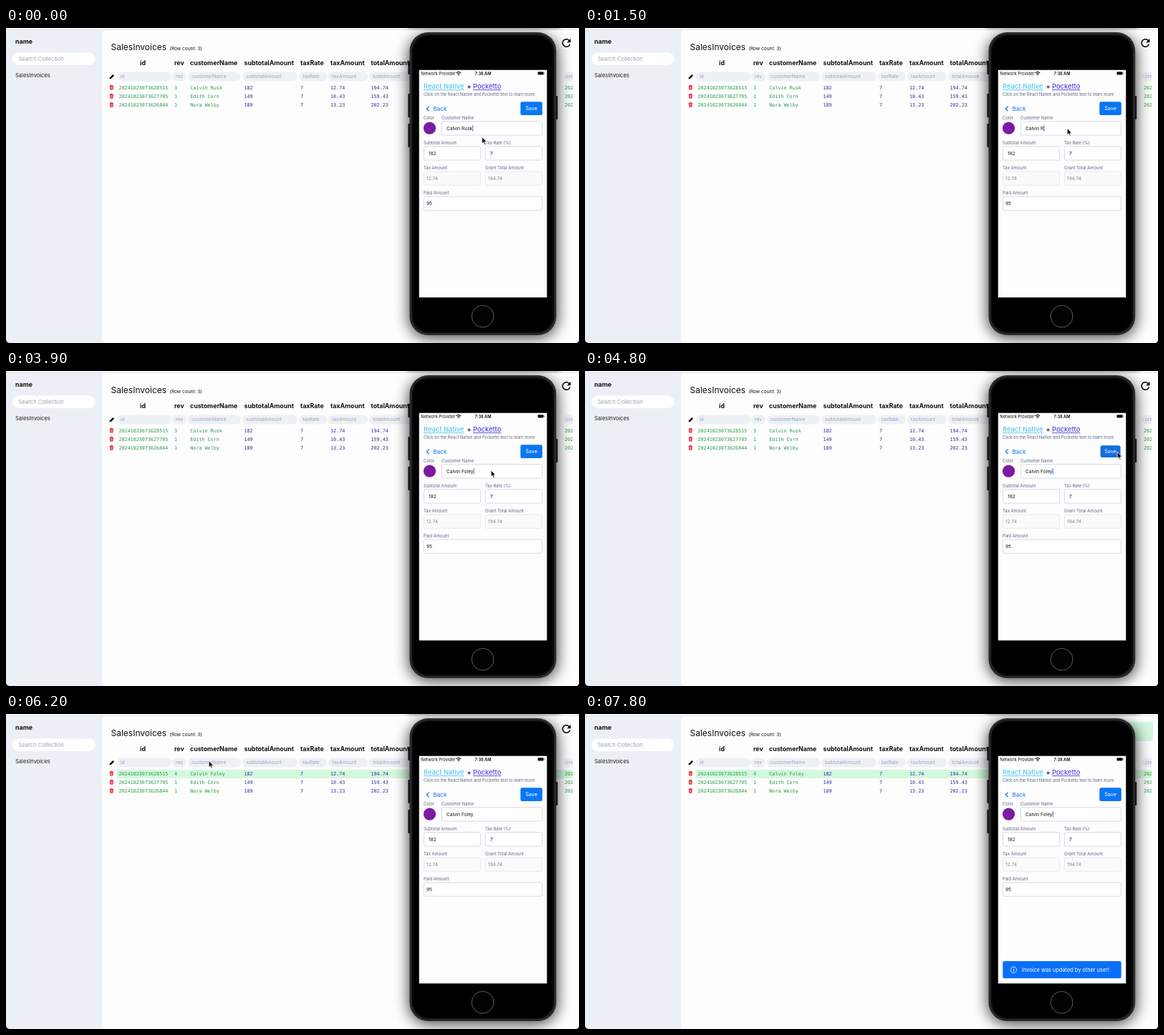
Recreate the animation shown at these times as an HTML page. Size 800 by 441 pixels, loop 7.9 s.

```html
<!DOCTYPE html>
<html lang="en">
<head>
<meta charset="utf-8">
<title>Invoice sync</title>
<style>
html, body { margin: 0; width: 100%; height: 100%; overflow: hidden; background: #000; }
svg { display: block; width: 100vw; height: 100vh; }
text { font-family: Inter, "Open Sans", sans-serif; white-space: pre; }
.b { font-weight: 700; }
.sb { font-weight: 600; }
.m { font-weight: 500; }
.u { font-weight: 500; text-decoration: underline; }
.mono { font-family: "DejaVu Sans Mono", monospace; }
</style>
</head>
<body>
<svg id="stage" viewBox="0 0 800 441" preserveAspectRatio="none"></svg>
<script>
const LOOP = 7900;
const GREEN = '#2b9a48', NAVY = '#34309a', MUTED = '#98a3b5', LABEL = '#5d6880';

const text = (x, y, size, str, fill = '#111', cls = '', more = '') =>
  `<text x="${x}" y="${y}" font-size="${size}" fill="${fill}" class="${cls}" ${more}>${str}</text>`;
const rect = (x, y, w, h, fill, r = 0, more = '') =>
  `<rect x="${x}" y="${y}" width="${w}" height="${h}" rx="${r}" fill="${fill}" ${more}/>`;
const path = (d, more) => `<path d="${d}" ${more}/>`;

// Collection browser
const columns = [
  ['id', 155, 76, 187], ['rev', 232, 20, 235], ['customerName', 254, 74, 257],
  ['subtotalAmount', 330, 77, 332.5], ['taxRate', 409, 39, 411],
  ['taxAmount', 450, 55, 453], ['totalAmount', 507, 60, 509.5]
];
const rows = [
  ['20241023073628515', '3', 'Calvin Rusk', '182', '7', '12.74', '194.74'],
  ['20241023073627705', '1', 'Edith Corn', '149', '7', '10.43', '159.43'],
  ['20241023073626844', '1', 'Nora Welby', '189', '7', '13.23', '202.23']
];
const cellX = [157.5, 235, 257.3, 332.5, 411, 453, 509.5];

const header = columns.map(([name, x, w, hx]) =>
  text(hx, 52, 8.8, name, '#111', 'b') +
  rect(x, 61.5, w, 13, '#edf0f5', 6.5) +
  text(x + 5, 70.2, 6.7, name, MUTED)).join('');

const trash = y =>
  `<g transform="translate(144.6 ${y - 6.3})" fill="none" stroke="#e5262b" stroke-width=".9">` +
  path('M0 1.5H5.4M1.7 1.3V.4H3.7V1.3', '') +
  path('M.7 1.8L1 6.4H4.4L4.7 1.8Z', 'fill="#f47c7e"') + '</g>';

const body = rows.map((row, i) => {
  const y = 86 + i * 12.1;
  return trash(y) + row.map((value, c) =>
    text(cellX[c], y, 6.72, value, c < 3 ? GREEN : NAVY, 'mono',
      i ? '' : `id="cell${c}"`)).join('') +
    text(780, y, 6.72, '202', GREEN, 'mono');
}).join('');

const browser =
  rect(0, -8, 800, 449, '#ecf0f6', 5) +
  rect(0, 0, 800, 2.2, '#f6f7f9') + rect(0, 2.2, 800, .8, '#e2e5ea') +
  path('M800 3H140Q134 3 134 9V435Q134 441 140 441H795Q800 441 800 436Z', 'fill="#fdfdfe"') +
  text(13, 22, 8.9, 'name', '#111', 'b') +
  rect(9, 34.5, 115.5, 17.5, '#fff', 8.7) +
  text(17.5, 46, 7.6, 'Search Collection', MUTED) +
  text(13, 69.4, 7.55, 'SalesInvoices', '#222') +
  text(146.5, 30.6, 12, 'SalesInvoices') +
  text(228.5, 30.6, 6.55, '(Row count: 3)') +
  path('M17.65 6.35C16.2 4.9 14.21 4 12 4c-4.42 0-7.99 3.58-7.99 8s3.57 8 7.99 8c3.73 0 6.84-2.55 7.73-6h-2.08c-.82 2.33-3.04 4-5.65 4-3.31 0-6-2.69-6-6s2.69-6 6-6c1.66 0 3.14.69 4.22 1.78L13 11h7V4l-2.35 2.35z',
    'transform="translate(773.4 12) scale(.75)"') +
  path('M144.5 71.5L145 69.2 149.3 64.9 151.1 66.7 146.8 71Z', 'fill="#111"') +
  rect(154.5, 78, 636.5, 12, '#d2f8dd', 0, 'id="mark"') +
  `<g clip-path="url(#page)">${header}${rect(778, 61.5, 40, 13, '#edf0f5', 6.5)}` +
  text(782, 70.2, 6.7, 'createdAt', MUTED) + body + '</g>' +
  rect(690, 11, 103, 27, '#d2f7de', 3, 'id="notice"');

// Phone
const field = (x, y, w, label, value, pad = 7, off = false) =>
  text(x, y - 2.2, 5.9, label, LABEL) +
  rect(x + .4, y + .4, w - .8, 19.2, off ? '#fafafb' : '#fff', 2,
    `stroke="${off ? '#e3e5ea' : '#cbd1dd'}" stroke-width=".8"`) +
  text(x + pad, y + 12.4, 6.55, value, off ? '#85888e' : '#111');

const screen =
  rect(576.5, 58.5, 179, 319, '#fdfdfe') +
  text(579.3, 65.8, 5.85, 'Network Provider') +
  '<g fill="none" stroke="#111" stroke-width="1.1">' +
  path('M628.6 62.9Q631.9 59.8 635.2 62.9M630 64.4Q631.9 62.7 633.8 64.4', '') + '</g>' +
  '<circle cx="631.9" cy="65.6" r=".8"/>' +
  text(666, 65.8, 5.7, '7:38 AM', '#111', 'sb', 'text-anchor="middle"') +
  rect(742.5, 61.2, 8, 4.4, '#111', 1) + rect(750.9, 62.5, .7, 1.8, '#111') +
  text(583, 85.2, 9.35, 'React Native', '#55c9f3', 'u') +
  text(643.6, 85.2, 9.35, '+', '#111', 'm') +
  text(652, 85.2, 9.35, 'Pocketto', '#4f46e5', 'u') +
  text(583, 94.6, 5.77, 'Click on the React Native and Pocketto text to learn more', LABEL) +
  path('M590.6 109.6L587.3 113 590.6 116.4', 'fill="none" stroke="#0a74e8" stroke-width="1.2"') +
  text(596.5, 115.8, 8.1, 'Back', '#0a74e8') +
  rect(718.3, 103.3, 30.5, 18.7, '#0b76f3', 2.5, 'id="save"') +
  text(733.6, 115.4, 7.3, 'Save', '#fff', '', 'text-anchor="middle"') +
  text(583, 128.2, 5.85, 'Color', LABEL) +
  '<circle cx="591.5" cy="140.2" r="8.6" fill="#7c1aa3"/>' +
  field(608, 130.4, 141, 'Customer Name', '') +
  text(615, 142.6, 6.55, '', '#111', '', 'id="typed"') +
  rect(0, 136, .9, 8.6, '#2b62f0', 0, 'id="caret"') +
  field(583, 165.4, 80, 'Subtotal Amount', '182') +
  field(669, 165.4, 80, 'Tax Rate (%)', '7') +
  field(583, 200.6, 80, 'Tax Amount', '12.74', 4, true) +
  field(669, 200.6, 80, 'Grant Total Amount', '194.74', 4, true) +
  field(583, 235.6, 166, 'Paid Amount', '95', 4) +
  '<g id="toast">' + rect(583.3, 346, 165.4, 24, '#0a6ff8', 2.5) +
  '<circle cx="598.4" cy="358.2" r="4.2" fill="none" stroke="#fff" stroke-width=".8"/>' +
  rect(598, 357.4, .9, 3, '#fff') + rect(598, 355.6, .9, 1, '#fff') +
  text(610, 360.9, 7.37, 'Invoice was updated by other user!', '#fff') + '</g>';

const phone =
  rect(558, -16, 218, 15, '#000', 6, 'filter="url(#soft)" opacity=".8"') +
  rect(562, 10, 208, 424, '#000', 28, 'filter="url(#blur)" opacity=".72"') +
  rect(561.4, 46, 4, 19, '#111', 1) + rect(561.4, 92, 4, 33, '#111', 1) +
  rect(561.4, 134, 4, 33, '#111', 1) + rect(766, 95, 4.2, 33, '#111', 1) +
  rect(563.5, 6, 204.7, 424, '#29292b', 26) +
  rect(566.5, 9, 198.7, 418, '#0c0c0d', 23.5) +
  rect(568.5, 11, 194.7, 414, '#000', 22) +
  '<circle cx="665.6" cy="403.7" r="15.4" fill="#020202" stroke="#77777a" stroke-width=".8"/>' +
  `<g clip-path="url(#glass)">${screen}</g>`;

const $ = id => document.getElementById(id);
$('stage').innerHTML =
  '<defs><filter id="blur" x="-40%" y="-20%" width="180%" height="140%"><feGaussianBlur stdDeviation="10"/></filter>' +
  '<filter id="soft" x="-10%" y="-100%" width="120%" height="300%"><feGaussianBlur stdDeviation="2.5"/></filter>' +
  `<clipPath id="page">${rect(134, 0, 657, 441, '#000')}</clipPath>` +
  `<clipPath id="glass">${rect(576.5, 58.5, 179, 319, '#000')}</clipPath></defs>` +
  browser + phone +
  path('M0 0V9.2L2.1 7.3 3.6 10.8 5.1 10.1 3.6 6.8H6.5Z',
    'id="mouse" fill="#000" stroke="#fff" stroke-width=".8" stroke-linejoin="round"');

// Timeline
const track = [
  [0, 664.6, 152.6], [600, 673.2, 140.4], [3800, 673.2, 140.4], [4500, 743.2, 113.4],
  [5200, 743.2, 113.4], [5900, 283.2, 65.4], [6300, 283.2, 65.4], [6600, 283.2, 95.4],
  [7200, 283.2, 95.4], [7700, 195, 28]
];
const edits = [
  [0, 'Calvin Rusk'], [1200, 'Calvin Rus'], [1300, 'Calvin Ru'], [1400, 'Calvin R'],
  [1600, 'Calvin '], [2200, 'Calvin F'], [2500, 'Calvin Fo'], [2800, 'Calvin Fol'],
  [3100, 'Calvin Fole'], [3300, 'Calvin Foley']
];

const ease = (t, from, to) => {
  const k = Math.min(1, Math.max(0, (t - from) / (to - from)));
  return k * k * (3 - 2 * k);
};
const show = (id, on) => $(id).setAttribute('visibility', on ? 'visible' : 'hidden');
const set = (id, attrs) => {
  for (const key in attrs) $(id).setAttribute(key, attrs[key]);
};

function draw(t) {
  const i = track.findLastIndex(p => p[0] <= t);
  const [t0, x0, y0] = track[i], [t1, x1, y1] = track[i + 1] || [t0 + 1, x0, y0];
  const k = ease(t, t0, t1);
  set('mouse', { transform: `translate(${x0 + (x1 - x0) * k} ${y0 + (y1 - y0) * k})` });
  show('mouse', t < 7800);

  const typed = $('typed');
  typed.textContent = edits.findLast(e => e[0] <= t)[1];
  set('caret', { x: 615.2 + typed.getComputedTextLength() });
  const blinkOff = t % 1000 >= 100 && t % 1000 < 600;
  show('caret', (t >= 1100 && t < 3600) || !blinkOff);

  const pressed = t >= 4700 && t < 5000;
  set('save', pressed
    ? { x: 719.6, y: 104.2, width: 28, height: 16.9, fill: '#126fdc' }
    : { x: 718.3, y: 103.3, width: 30.5, height: 18.7, fill: '#0b76f3' });

  const saved = t >= 5000;
  show('mark', saved);
  $('cell1').textContent = saved ? '4' : '3';
  $('cell2').textContent = saved ? 'Calvin Foley' : 'Calvin Rusk';

  show('notice', t >= 6300);
  set('notice', { transform: `translate(${110 * (1 - ease(t, 6250, 6500))} 0)` });
  show('toast', t >= 6300);
  set('toast', { transform: `translate(0 ${34 * (1 - ease(t, 6250, 6600))})` });
}

const start = performance.now();
function tick() {
  draw((performance.now() - start) % LOOP);
  requestAnimationFrame(tick);
}
tick();
</script>
</body>
</html>
```
